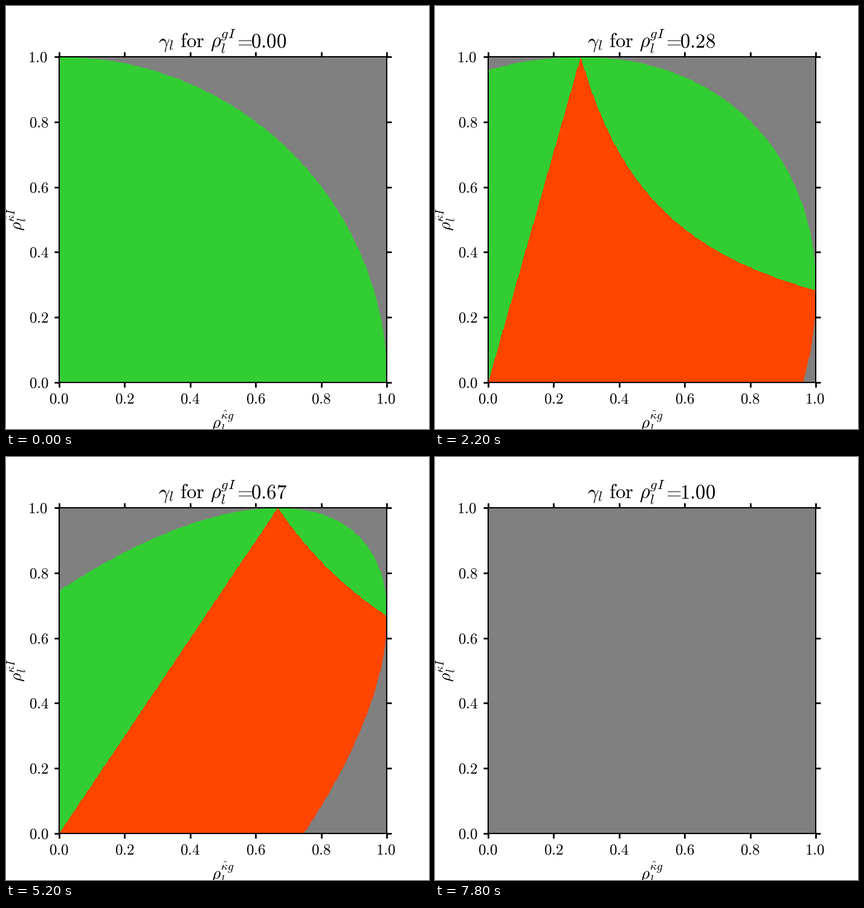
Write a matplotlib script that moves like this. It is 700x700 px and loops after 8 s.

```python
import numpy as np
import matplotlib.pyplot as plt
from matplotlib.animation import FuncAnimation
from matplotlib.colors import ListedColormap

SIZE, DPI = 700, 100
FRAMES, INTERVAL = 40, 200
LEFT, RIGHT, TOP, BOTTOM = 87.5, 630, 84, 623
GRID = 500

plt.rcParams["mathtext.fontset"] = "cm"
fig = plt.figure(figsize=(SIZE / DPI, SIZE / DPI), dpi=DPI, facecolor="white")
ax = fig.add_axes([LEFT / SIZE, 1 - BOTTOM / SIZE,
                   (RIGHT - LEFT) / SIZE, (BOTTOM - TOP) / SIZE])


def tex(x, y, s, em, ha="left", rotation=0):
    """Math text with its baseline at pixel (x, y), y pointing down."""
    return fig.text(x / SIZE, 1 - y / SIZE, f"${s}$", fontsize=em * 72 / DPI,
                    ha=ha, va="baseline", rotation=rotation,
                    rotation_mode="anchor")


def scripted(x, y, em, base, sub, sup=(), rise=0.0, drop=0.15, rotation=0):
    """Base symbol with a subscript and (symbol, advance) superscripts."""
    def put(dx, dy, s, size):
        if rotation:
            tex(x + dy, y - dx, s, size, rotation=rotation)
        else:
            tex(x + dx, y + dy, s, size)

    small = 0.7 * em
    edge = 0.517 * em
    put(0, 0, base, em)
    put(edge, drop * em, sub, small)
    for s, advance in sup:
        put(edge, -rise * em, s, small)
        edge += advance * small


# axes frame and ticks
ticks = np.linspace(0, 1, 6)
ax.set(xticks=ticks, yticks=ticks)
ax.tick_params(direction="out", length=6, width=2, top=True, right=True,
               labelbottom=False, labelleft=False)
for spine in ax.spines.values():
    spine.set_linewidth(1.5)
for v in ticks:
    bearing = 2 * int(v)  # a leading "1" has a wider side bearing
    tex(LEFT + v * (RIGHT - LEFT) - bearing, 657.6, f"{v:.1f}", 25, ha="center")
    tex(71 - bearing, BOTTOM - v * (BOTTOM - TOP) + 8.6, f"{v:.1f}", 25,
        ha="right")

# axis labels
kappa = (r"\hat{\kappa}", 0.576)
scripted(340.2, 697.4, 27.7, r"\rho", "l", [kappa, ("g", 0.5)], 0.48, 0.302)
scripted(25.4, 371.5, 27.7, r"\rho", "l", [kappa, ("I", 0.5)], 0.363, 0.283,
         rotation=90)

# title
BASE, EM = 68.5, 33
scripted(252, BASE, EM, r"\gamma", "l")
tex(288.2, BASE, r"\mathrm{for}", EM)
scripted(338.2, BASE, EM, r"\rho", "l", [("g", 0.513), ("I", 0.5)], 0.48, 0.302)
tex(393.2, BASE, "=", EM, ha="center")
value = tex(405.4, BASE, "0.00", EM)

# 0: impossible, 1: green zone, 2: orange zone
x, y = np.meshgrid(np.linspace(0, 1, GRID), np.linspace(0, 1, GRID))


def zones(r):
    valid = (1 - x**2) * (1 - r**2) > (y - r * x)**2
    orange = (x > r * y) & (x * y < r)
    return np.where(valid, np.where(orange, 2, 1), 0)


# cells are centred on the sample points
half = 0.5 / (GRID - 1)
image = ax.imshow(zones(0), origin="lower", aspect="auto",
                  extent=(-half, 1 + half, -half, 1 + half),
                  cmap=ListedColormap(["gray", "limegreen", "orangered"]),
                  vmin=0, vmax=2, interpolation="nearest")
ax.set(xlim=(0, 1), ylim=(0, 1))


def update(i):
    r = i / (FRAMES - 1)
    image.set_data(zones(r))
    value.set_text(f"${r:.2f}$")
    return image, value


anim = FuncAnimation(fig, update, frames=FRAMES, interval=INTERVAL,
                     repeat=True, repeat_delay=0)
plt.show()
```
